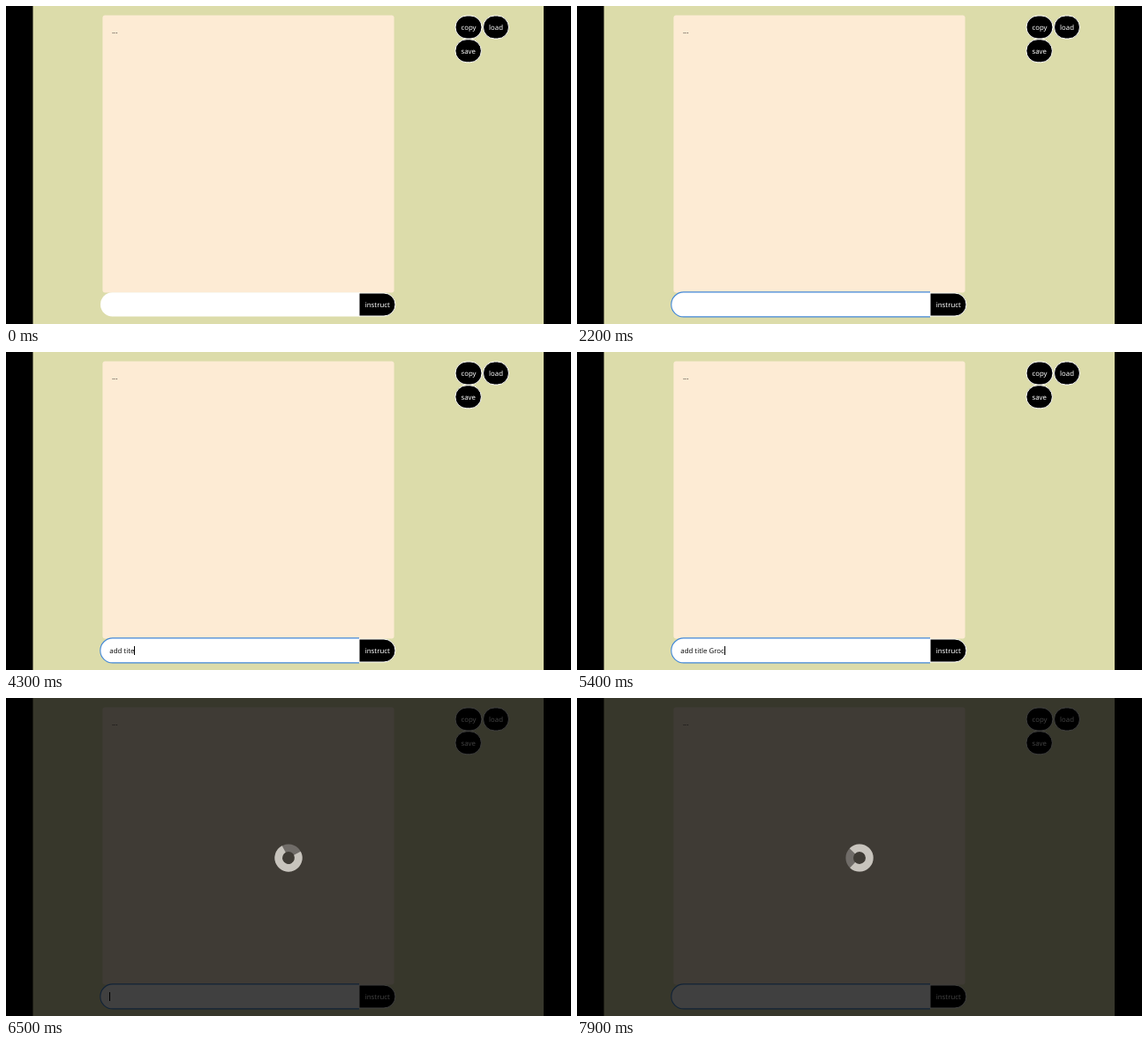
These frames come from a looping animation (640 by 360 pixels, 8000 ms). An HTML page:

```html
<!DOCTYPE html>
<html lang="en">
<head>
<meta charset="utf-8">
<title>Instruct editor</title>
<style>
  html, body { margin: 0; width: 100%; height: 100%; overflow: hidden; background: #000; }
  #stage { display: block; width: 640px; height: 360px; }
  text {
    font: 7.83px "Noto Sans", "Open Sans", sans-serif; fill: #111;
    white-space: pre; text-rendering: geometricPrecision;
  }
  .btn rect, .btn path { fill: #000; stroke: #fff; }
  .btn text { fill: #fff; text-anchor: middle; }
</style>
</head>
<body>
<svg id="stage" viewBox="0 0 640 360">
  <rect width="640" height="360"/>
  <rect x="30.5" width="578.5" height="360" fill="#dcdcaa"/>
  <rect x="109.4" y="10.4" width="330.2" height="314" rx="3" fill="#fdebd4"/>
  <text x="120" y="31">...</text>

  <path d="M401 324.3H120.6A13.6 13.6 0 0 0 120.6 351.5H401Z" fill="#fff"/>
  <path id="focus" d="M400 323.9H120.8A14 14 0 0 0 120.8 351.9H400" fill="#fff" stroke="#4187d8" stroke-width="1.1"/>
  <text id="text" x="117.3" y="340.8"></text>
  <rect id="caret" y="333" width="1" height="10"/>

  <g class="btn">
    <path d="M400 325H428A13 13 0 0 1 428 351H400Z"/>
    <text x="420.8" y="340.8">instruct</text>
    <rect x="509" y="11" width="30" height="26" rx="13"/>
    <text x="524" y="26.7">copy</text>
    <rect x="540.5" y="11" width="29" height="26" rx="13"/>
    <text x="555" y="26.7">load</text>
    <rect x="508.9" y="37.8" width="29.5" height="26" rx="13"/>
    <text x="523.7" y="53.5">save</text>
  </g>

  <path id="beam" d="M-1.7-3.2Q-.4-3.2 0-2.6Q.4-3.2 1.7-3.2M0-2.6V2.6M-1.7 3.2Q-.4 3.2 0 2.6Q.4 3.2 1.7 3.2" fill="none" stroke="#333" stroke-width=".7"/>
  <path id="arrow" d="M0 0V7L1.6 5.6L2.7 8L3.7 7.5L2.7 5.2H4.8Z" stroke="#fff" stroke-width=".5"/>

  <g id="busy">
    <rect width="640" height="360" fill-opacity=".75"/>
    <g transform="translate(320 181)" fill="none" stroke-width="8.6">
      <circle r="11.3" stroke="#706c68"/>
      <circle id="ring" r="11.3" stroke="#c8c4bd" pathLength="4" stroke-dasharray="3 1"/>
    </g>
  </g>
</svg>
<script>
  const LOOP = 8000, STEP = 100, FOCUS = 1100, SEND = 6500;

  // Typing bursts: start time, then one entry per step; "<" is backspace.
  const BURSTS = [
    [2400, "a", "d"], [2700, "d "], [2900, "t", "i", "t"], [3300, "e", "l"],
    [4300, "<", "<"], [4600, "l", "e", " "], [5000, "G", "r", "o"],
    [5400, "c", "e", "r", "y", " ", "L"], [6100, "i", "s", "t"]
  ];
  // Pointer stops: time, x, y, shape.
  const STOPS = [
    [300, 390, 323, "beam"], [400, 350, 334, "beam"], [500, 286, 344, "beam"],
    [600, 228, 349, "beam"], [700, 203, 350, "beam"], [900, 201.3, 349, "beam"],
    [1000, 201.3, 348, "beam"], [1100, 330, 335, "beam"], [1200, 583, 298, "arrow"],
    [1300, 0, 0, ""]
  ];
  const CARET_OFF = [[2200, 2400], [7500, LOOP]];

  const $ = id => document.getElementById(id);
  const show = (el, on) => { el.style.visibility = on ? "visible" : "hidden"; };

  function typed(t) {
    let s = "";
    if (t >= SEND) return s;
    for (const [start, ...keys] of BURSTS)
      keys.forEach((key, i) => {
        if (t >= start + i * STEP) s = key === "<" ? s.slice(0, -1) : s + key;
      });
    return s;
  }

  function draw(t) {
    const text = $("text"), caret = $("caret");
    show($("focus"), t >= FOCUS);
    text.textContent = typed(t);
    caret.setAttribute("x", Math.round(117.3 + text.getComputedTextLength()));
    show(caret, t >= FOCUS && !CARET_OFF.some(([a, b]) => t >= a && t < b));

    const [, x, y, shape] = STOPS.filter(s => s[0] <= t).pop() || [0, 0, 0, ""];
    for (const id of ["beam", "arrow"]) {
      show($(id), id === shape);
      $(id).setAttribute("transform", `translate(${x} ${y})`);
    }

    show($("busy"), t >= SEND);
    // One turn takes 2 s; the dash gap follows the rotation.
    $("ring").setAttribute("transform", `rotate(${-28 + (t - SEND) * 0.18})`);
  }

  const begin = performance.now();
  function frame() {
    const t = (performance.now() - begin) % LOOP;
    draw(Math.floor(t / STEP) * STEP);
    requestAnimationFrame(frame);
  }
  frame();
</script>
</body>
</html>
```
